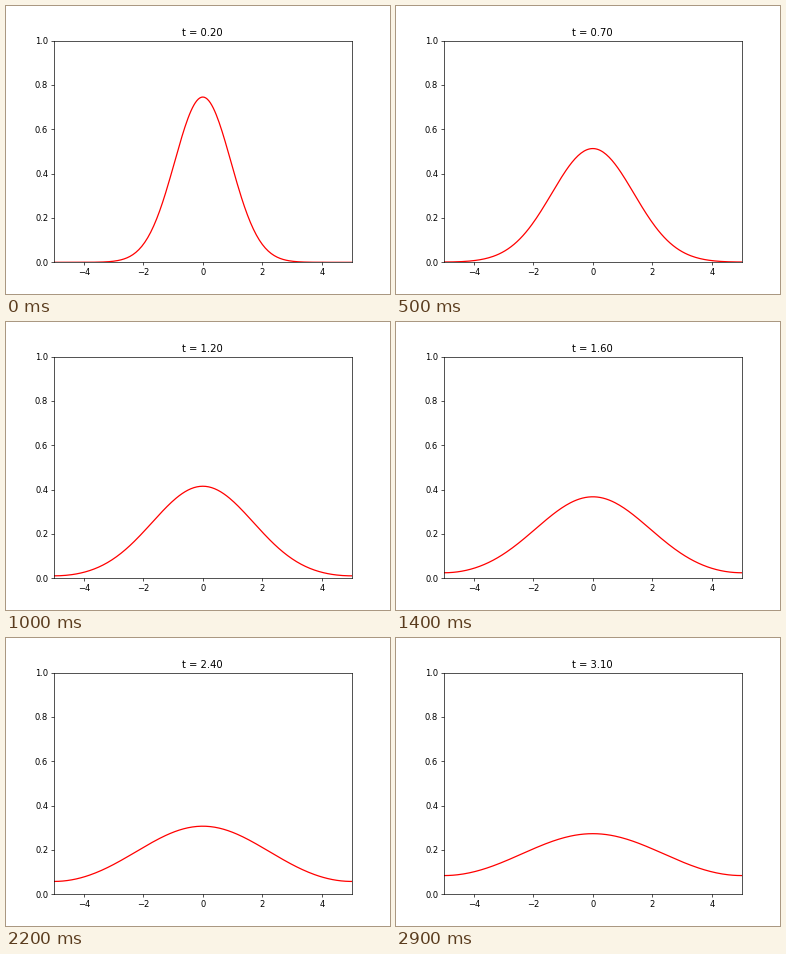
A matplotlib script that plays this animation: 384 px wide and 288 px high, repeating every 3000 ms.

```python
import numpy as np
import matplotlib.pyplot as plt
from matplotlib.animation import FuncAnimation

FRAMES = 30
INTERVAL = 100  # ms
HALF = 5        # half width of the periodic domain

x = np.linspace(-HALF, HALF, 201)


def heat(t):
    """Gaussian exp(-x^2) diffusing for time t on a periodic domain."""
    spread = 1 + 4 * t
    images = (np.exp(-(x - 2 * HALF * k) ** 2 / spread) for k in range(-3, 4))
    return sum(images) / np.sqrt(spread)


plt.rcParams["font.family"] = "DejaVu Sans"
fig, ax = plt.subplots(figsize=(6.4, 4.8), dpi=60)
ax.set_xlim(-HALF, HALF)
ax.set_ylim(0, 1)
line, = ax.plot(x, heat(0.2), color="red", lw=1.5)
title = ax.set_title("t = 0.20")


def update(i):
    t = 0.2 + 0.1 * i
    line.set_ydata(heat(t))
    title.set_text(f"t = {t:.2f}")
    return line, title


anim = FuncAnimation(fig, update, frames=FRAMES, interval=INTERVAL,
                     repeat=True, repeat_delay=0, blit=False)
plt.show()
```
